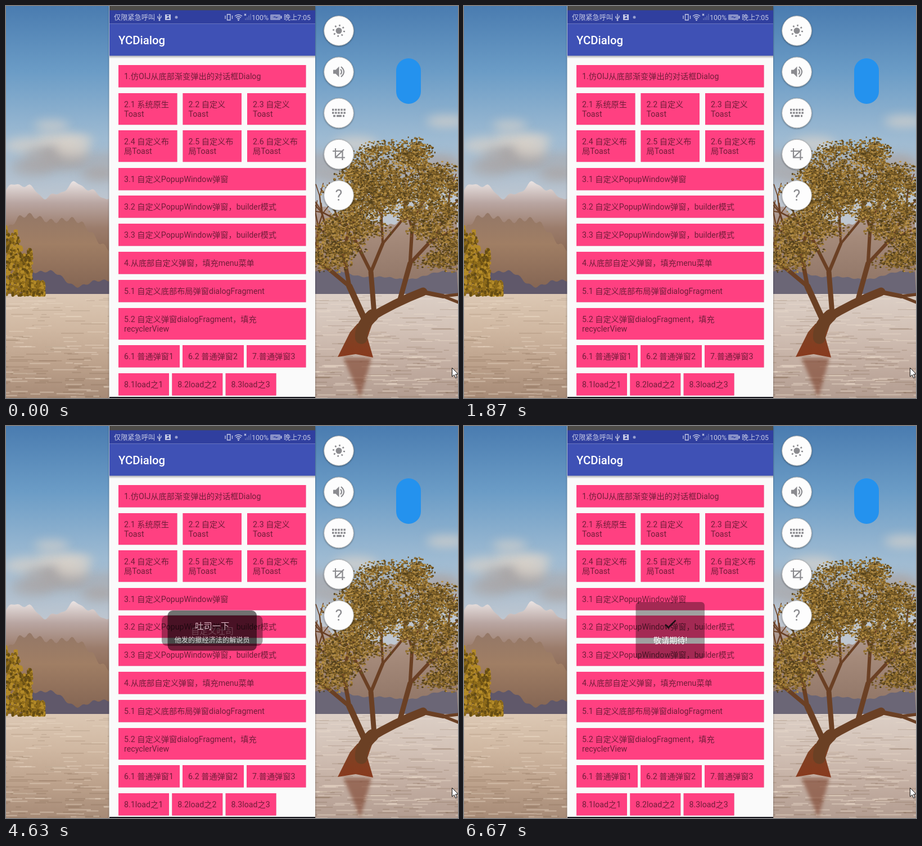
An HTML page with a canvas that plays this animation: 804 px wide and 697 px high, repeating every 8 s.

```html
<!DOCTYPE html>
<html lang="zh-CN">
<head>
<meta charset="utf-8">
<style>
html, body { margin: 0; width: 100%; height: 100%; overflow: hidden; background: #789; }
canvas, svg { position: absolute; left: 0; top: 0; width: 804px; height: 697px; }
text { font-family: Roboto, "Noto Sans CJK SC", "Noto Sans CJK", sans-serif; }
.mid { text-anchor: middle; }
.button { fill: #ff4081; filter: drop-shadow(0 .5px .7px rgba(0,0,0,.25)); }
.label { font-size: 14.2px; fill: rgba(0,0,0,.56); }
.choice { font-size: 18px; fill: #85858f; }
.choice:last-child { fill: #3a80dc; }
.icon { fill: none; stroke: #8b8b8f; stroke-width: 2.2; }
.icon .solid { fill: #8b8b8f; stroke: none; }
.line { fill: none; stroke: #fff; stroke-width: 1.3; }
.toast text { fill: #fff; }
</style>
</head>
<body>
<canvas id="photo" width="804" height="697"></canvas>
<svg viewBox="0 0 804 697">
  <defs>
    <filter id="soft" x="-20%" y="-20%" width="140%" height="140%">
      <feDropShadow dx="0" dy="1" stdDeviation="1.5" flood-opacity=".45"/>
    </filter>
    <linearGradient id="shade" x2="0" y2="1">
      <stop stop-opacity=".28"/><stop offset="1" stop-opacity="0"/>
    </linearGradient>
  </defs>

  <rect x="183.5" width="366.5" height="697" fill="#fafafa" filter="url(#soft)"/>
  <rect x="184" width="366" height="8" fill="#4d4b47"/>
  <rect x="184" y="7.5" width="366" height="24" fill="#303f9f"/>
  <rect x="184" y="31.5" width="366" height="57" fill="#3f51b5"/>
  <rect x="184" y="88.5" width="366" height="5" fill="url(#shade)"/>
  <text x="200" y="68" font-size="20.3" font-weight="500" fill="#fff">YCDialog</text>
  <g id="buttons"></g>
  <rect x="184" y="695" width="366" height="2" fill="#15151c"/>

  <g id="dialog">
    <rect x="184" y="7.5" width="366" height="688" opacity=".6"/>
    <rect x="194" y="516.5" width="345.5" height="123.5" rx="5" fill="#ececec"/>
    <path d="M194 557.5H539.5M194 599H539.5" stroke="#d4d4d6"/>
    <rect x="194" y="645" width="345.5" height="40.5" rx="5" fill="#ececec"/>
    <g class="mid" id="choices"></g>
  </g>

  <g id="status" fill="#fff" font-size="12.2">
    <text x="192" y="24.5">仅限紧急呼叫</text>
    <path class="line" d="M273 14V26M270 18V21L273 23L276 20V17"/>
    <circle cx="273" cy="25" r="1.5"/>
    <path d="M283 15h10v10h-10zM285 23h6l-2-4-2 2zM286 16v2h4v-2z" fill-rule="evenodd"/>
    <circle cx="303" cy="20" r="2.5" opacity=".7"/>
    <path class="line" d="M393.5 15h5.5v10h-5.5zM390 17v6M402.5 17v6"/>
    <path class="line" d="M407 18q6.5-5 13 0M409 20.5q4.5-3.5 9 0M411 23q2.500-2 5 0"/>
    <circle cx="413.5" cy="25" r="1.3"/>
    <path class="line" d="M424 14l3 3m0-3l-3 3"/>
    <path class="line" d="M426 25V22M429 25V20M432 25V17M435 25V14" opacity=".4"/>
    <text x="437" y="24.5" font-size="12.5">100%</text>
    <rect x="470" y="15" width="18" height="10" rx="1.5" opacity=".6"/>
    <rect x="488.5" y="17.5" width="2" height="5"/>
    <path d="M474 20l5-2v1.5h6l-5 2.5v-1.5z" fill="#303f9f"/>
    <text x="494" y="24.5">晚上7:05</text>
  </g>

  <g class="toast mid" id="plain">
    <rect x="277" y="336.5" width="179.5" height="54.5" rx="9" opacity=".75"/>
    <text x="367" y="369.7" font-size="15.2">自定义吐司</text>
  </g>
  <g class="toast mid" id="titled">
    <rect x="287.5" y="328" width="158.5" height="71.5" rx="9" opacity=".83"/>
    <text x="366.7" y="361" font-size="15.2">吐司一下</text>
    <text x="366.7" y="384.5" font-size="12.2">他发的撤经济法的解说员</text>
  </g>
  <g class="toast mid" id="check">
    <rect x="305.5" y="313" width="122.500" height="101" rx="6" opacity=".36"/>
    <path d="M358 353l5.500 5.500L376.500 345.500" fill="none" stroke="#1c1016" stroke-width="2.6"/>
    <text x="367" y="385.500" font-size="14.2">敬请期待!</text>
  </g>

  <g id="tools"></g>
  <g class="icon">
    <circle class="solid" cx="592" cy="44" r="5.500"/>
    <circle cx="592" cy="44" r="9.500" stroke-width="3" stroke-dasharray="2.500 4.960"/>
    <path class="solid" d="M582 113.500h4.500l6-6v19l-6-6h-4.500z"/>
    <path d="M595 112.500q4 4.500 0 9M596 108q10 9 0 18"/>
    <path d="M580 184.500h24M580 190h24" stroke-width="3.500" stroke-dasharray="3.500 1.600"/>
    <path d="M582 195.500h4m2 0h9m2 0h3" stroke-width="3.500"/>
    <path d="M586 253V269.500H603M581 258H598.500V274M601 255L586 269.500"/>
  </g>
  <text class="mid" x="592" y="346" font-size="27" fill="#8b8b8f">?</text>
  <rect x="694" y="93" width="44" height="81" rx="22" fill="#2492ee"/>
  <path d="M793.500 643.500v15.500l3.600-3.300 2.600 5.800 2.500-1.100-2.600-5.600h5z" fill="#fff" stroke="#111"/>
</svg>

<script>
const $ = id => document.getElementById(id);

// Cells share the row unless a width is given; "|" breaks a label.
const left = 200, right = 533.5, lineHeight = 16.6;
const rows = [
  { labels: ['1.仿OIJ从底部渐变弹出的对话框Dialog'] },
  { labels: ['2.1 系统原生|Toast', '2.2 自定义|Toast', '2.3 自定义|Toast'] },
  { labels: ['2.4 自定义布|局Toast', '2.5 自定义布|局Toast', '2.6 自定义布|局Toast'] },
  { labels: ['3.1 自定义PopupWindow弹窗'] },
  { labels: ['3.2 自定义PopupWindow弹窗，builder模式'] },
  { labels: ['3.3 自定义PopupWindow弹窗，builder模式'] },
  { labels: ['4.从底部自定义弹窗，填充menu菜单'] },
  { labels: ['5.1 自定义底部布局弹窗dialogFragment'] },
  { labels: ['5.2 自定义弹窗dialogFragment，填充|recyclerView'] },
  { labels: ['6.1 普通弹窗1', '6.2 普通弹窗2', '7.普通弹窗3'], gap: 5, width: 109 },
  { labels: ['8.1load之1', '8.2load之2', '8.3load之3'], gap: 5.3, width: 90 }
];

function buttons() {
  let top = 105, out = '';
  for (const { labels, gap = 10, width } of rows) {
    const w = width || (right - left + gap) / labels.length - gap;
    const height = 23 + lineHeight * labels[0].split('|').length;
    labels.forEach((label, i) => {
      const x = left + i * (w + gap), y = Math.round(top);
      out += `<rect class="button" x="${x}" y="${y}" width="${Math.min(w, right - x)}" height="${height}"/>`;
      label.split('|').forEach((s, n) =>
        out += `<text class="label" x="${x + 10}" y="${y + 25.3 + n * lineHeight}">${s}</text>`);
    });
    top += height + 10.2;
  }
  return out;
}
$('buttons').innerHTML = buttons();

$('choices').innerHTML = ['拍照', '相册', '其他', '取消'].map((s, i) =>
  `<text class="choice" x="366.7" y="${544.5 + i * 41.5 + (i > 2 ? 4 : 0)}">${s}</text>`).join('');

$('tools').innerHTML = [0, 1, 2, 3, 4].map(i =>
  `<circle cx="592" cy="${44 + i * 73.2}" r="26.3" fill="#fdfdfd" stroke="#b5b5b5" filter="url(#soft)"/>`).join('');

drawPhoto($('photo').getContext('2d'));

function drawPhoto(c) {
  let seed = 7;
  const rand = (a = 0, b = 1) => a + (b - a) * (seed = seed * 16807 % 2147483647) / 2147483647;
  const pick = list => list[rand(0, list.length) | 0];
  const fade = (y0, y1, colors) => {
    const g = c.createLinearGradient(0, y0, 0, y1);
    colors.forEach((s, i) => g.addColorStop(i / (colors.length - 1), s));
    return g;
  };
  const box = (fill, x, y, w, h) => { c.fillStyle = fill; c.fillRect(x, y, w, h); };
  const blob = (fill, x, y, rx, ry) => {
    c.fillStyle = fill;
    c.beginPath();
    c.ellipse(x, y, rx, ry, 0, 0, 7);
    c.fill();
  };
  // Rugged skyline from a few sines, filled down to the lake
  const ridge = (fill, x0, x1, y, amp, wave) => {
    c.fillStyle = fill;
    c.beginPath();
    c.moveTo(x0, 512);
    for (let x = x0; x <= x1; x += 3)
      c.lineTo(x, y - amp * (Math.sin(x / wave) + .35 * Math.sin(x / wave * 2.7) + .15 * Math.sin(x / 3)));
    c.lineTo(x1, 512);
    c.fill();
  };

  // Sky and clouds
  box(fade(0, 350, ['#4a7cb0', '#6b9cc6', '#9dbad2', '#bfc6cf']), 0, 0, 804, 512);
  c.filter = 'blur(9px)';
  for (let i = 0; i < 26; i++) {
    const y = rand(205, 305);
    blob(y < 255 ? '#dfd5cbaa' : '#aaa5a599', i % 2 ? rand(0, 200) : rand(550, 804), y, rand(25, 65), rand(8, 20));
  }
  c.filter = 'none';

  // Mountains
  ridge(fade(305, 440, ['#f2eeee', '#b9a6a2', '#9b7c6b', '#8c6a55']), 0, 184, 328, 12, 16);
  ridge(fade(345, 500, ['#8f7568', '#a07e64', '#856654']), 0, 184, 400, 28, 45);
  ridge('#60586a', 40, 184, 482, 14, 30);
  ridge(fade(340, 480, ['#b3a5a3', '#a58a7a', '#94796a']), 550, 804, 372, 16, 38);
  ridge('#6b6676', 550, 804, 478, 7, 40);

  // Lake
  box(fade(512, 697, ['#dcc8b4', '#d0b8a2', '#bda28c', '#a68a76']), 0, 512, 184, 185);
  box(fade(512, 697, ['#dccfc6', '#d3c2b7', '#c3aea2', '#b39d91']), 550, 512, 254, 185);
  for (let i = 0; i < 650; i++) {
    const y = rand(514, 697);
    box(pick(['#f6e6d455', '#7a604c38']), rand(-20, 804), y, rand(8, 45), 1 + (y - 510) / 130);
  }

  // Autumn trees on the left shore
  for (let i = 0; i < 900; i++) {
    const x = rand(0, 68), top = 388 + x * 1.3 + 12 * Math.sin(x / 4);
    blob(pick(['#664d14', '#8d6a1a', '#b38a28']), x, rand(Math.max(top, x > 46 ? 490 : 0), 514), 2.5, 3);
  }

  // Trunk, then limbs that keep forking
  c.lineCap = 'round';
  c.strokeStyle = '#6b4024';
  const stroke = (w, path) => { c.lineWidth = w; c.stroke(new Path2D(path)); };
  const grow = (x, y, angle, length, w) => {
    const x1 = x + length * Math.cos(angle), y1 = y + length * Math.sin(angle);
    stroke(w, `M${x} ${y}L${x1} ${y1}`);
    if (w > 2)
      for (const side of [-1, 1])
        grow(x1, y1, angle + side * rand(.15, .5), length * rand(.7, .9), w * .68);
  };
  c.fillStyle = fade(560, 628, ['#7a4526', '#8a3a1e']);
  c.fill(new Path2D('M612 580L590 624L622 619L653 625L643 590L655 555L625 565Z'));
  stroke(22, 'M632 590Q630 570 652 550');
  stroke(15, 'M645 556Q690 528 742 508');
  grow(640, 562, -2, 70, 11);
  grow(655, 548, -1.65, 75, 9);
  grow(700, 525, -1.3, 70, 9);
  grow(738, 508, .2, 40, 8);
  c.filter = 'blur(3px)';
  c.fillStyle = '#7c402a99';
  c.fill(new Path2D('M600 626H650L642 655L630 697L615 660Z'));
  c.filter = 'none';

  // Puffs of leaves over the upper half of an ellipse
  const leaves = ['#52401c', '#6a5022', '#836328', '#9a7632', '#b58f48'];
  for (let i = 0; i < 110; i++) {
    const angle = rand(0, Math.PI), d = Math.sqrt(rand(.12, .95));
    const x = 697 + 145 * d * Math.cos(angle), y = 462 - 232 * d * Math.sin(angle);
    for (let n = 0; n < 110; n++) {
      const turn = rand(0, 6.283), r = rand();
      blob(pick(leaves), x + 28 * r * Math.cos(turn), y + 17 * r * Math.sin(turn), rand(1, 2.6), rand(.8, 2));
    }
  }
}

// The picture is refreshed only at these moments.
const ticks = [0, 500, 1870, 3600, 3940, 4630, 4960, 5640, 5990];
const toasts = { plain: [3485, 4800], titled: [4400, 5970], check: [5430, 9000] };
const fadeTime = 350;

function render() {
  const now = performance.now() % 8000;
  const t = ticks.filter(tick => tick <= now).pop();
  for (const id in toasts) {
    const [start, end] = toasts[id];
    $(id).setAttribute('opacity', Math.max(0, Math.min(1, (t - start) / fadeTime, (end - t) / fadeTime)));
  }
  const open = t === 500;
  $('dialog').setAttribute('opacity', open ? 1 : 0);
  $('status').setAttribute('opacity', open ? 1 : .72);
  requestAnimationFrame(render);
}
render();
</script>
</body>
</html>
```
